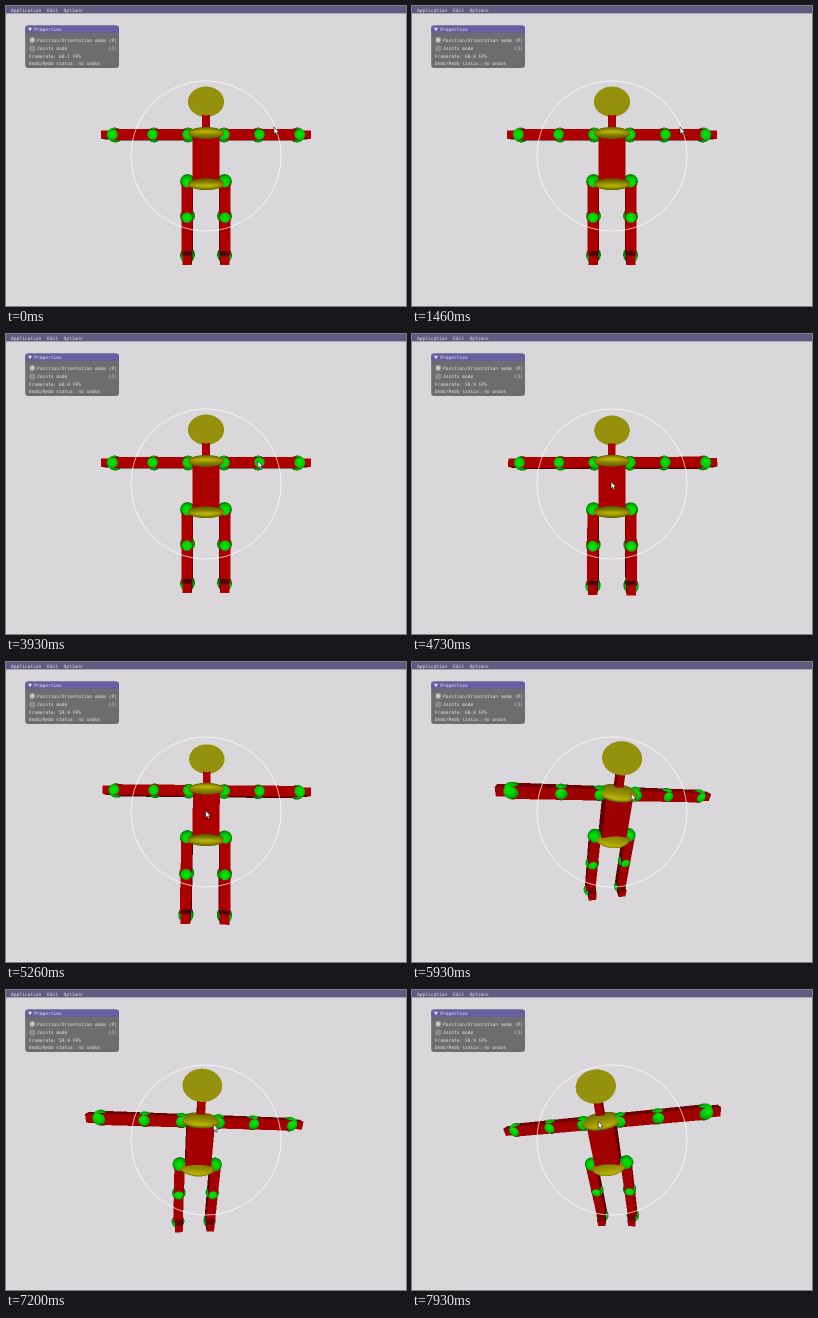
Recreate the animation shown at these times as an HTML page with a canvas. Size 400 px wide and 300 px high, loop 8 s.

```html
<!DOCTYPE html>
<html lang="en">
<head>
<meta charset="utf-8">
<title>Puppet viewer</title>
<style>
  html, body { margin: 0; width: 100%; height: 100%; overflow: hidden; background: #dad7da; }
  canvas, svg { position: absolute; left: 0; top: 0; width: 400px; height: 300px; }
  text { font: 4.58px "DejaVu Sans Mono", monospace; fill: #e4e4e4; white-space: pre; }
</style>
</head>
<body>
<canvas id="stage"></canvas>
<svg viewBox="0 0 400 300">
  <rect width="400" height="7.4" fill="#5f5b80"/>
  <text x="5" y="5.5">Application</text>
  <text x="41" y="5.5">Edit</text>
  <text x="57.5" y="5.5">Options</text>

  <rect x="19.2" y="19.5" width="93.8" height="42.5" rx="3" fill="#6e6c6f"/>
  <path d="M19.2 27V22.5a3 3 0 0 1 3-3h87.8a3 3 0 0 1 3 3V27z" fill="#6660a2"/>
  <path d="M22 21.8h4l-2 3.4z" fill="#e4e4e4"/>
  <text x="28.3" y="25.1">Properties</text>
  <g fill="#8b898c"><circle cx="26.3" cy="34" r="3.3"/><circle cx="26.3" cy="42.6" r="3.3"/></g>
  <circle cx="26.3" cy="34" r="2.2" fill="#c9c8ca"/>
  <text x="31" y="35.7">Position/Orientation mode (P)</text>
  <text x="31" y="44.3">Joints mode</text>
  <text x="102.6" y="44.3">(J)</text>
  <text x="22.7" y="51.7" id="rate"></text>
  <text x="22.7" y="58.7">Undo/Redo status: no undos</text>

  <circle cx="200" cy="150" r="75" fill="none" stroke="#fff" stroke-opacity=".7"/>
  <path id="cursor" d="M-2-4V3L-.4 1.6.8 4.2 2 3.6.9 1.1H3z" fill="#fff" stroke="#111" stroke-width=".6"/>
</svg>
<script>
const LOOP = 8000, CAMERA = 200, SCALE = 2;
const WIDTH = 400 * SCALE, HEIGHT = 300 * SCALE;
const stage = document.getElementById('stage');
stage.width = WIDTH;
stage.height = HEIGHT;
const ctx = stage.getContext('2d');
const image = ctx.createImageData(WIDTH, HEIGHT);
const depth = new Float32Array(WIDTH * HEIGHT);
const rate = document.getElementById('rate');
const cursor = document.getElementById('cursor');

const RED = [172, 0, 0], GREEN = [0, 226, 8], YELLOW = [184, 178, 4], OLIVE = [150, 145, 12];

// Parts lie along the model's own axes: x right, y down, z towards the viewer.
const parts = [];
const box = (mid, size) => parts.push({ mid, size, colour: RED, hit: hitBox, ambient: .4 });
const ellipsoid = (mid, size, colour, ambient = .4) =>
  parts.push({ mid, size, colour, hit: hitEllipsoid, ambient });
const ball = (x, y) => ellipsoid([x, y, 0], [7.3, 7.3, 7.3], GREEN);

for (const side of [-1, 1]) {
  for (const x of [18, 52, 91]) ball(side * x, -21);
  for (const y of [25.5, 60, 99]) ball(side * 18.5, y);
  box([side * 54, -21, 0], [37, 5.3, 5.3]);
  box([side * 97, -21, 0], [6, 4, 4]);
  box([side * 18.5, 61, 0], [5.3, 36, 5.3]);
  box([side * 17.5, 97, 6], [4.2, 4.5, 8]);
}
box([0, 3, 0], [12.9, 21, 9]);
box([0, -34, 0], [3.7, 8, 3.7]);
ellipsoid([0, -22, 0], [19, 6.4, 19], YELLOW);
ellipsoid([0, 27, 0], [19, 6.4, 19], YELLOW);
ellipsoid([0, -54, 0], [18, 14.5, 15], OLIVE, 1);

// Each hit test sets the distance along the ray and how squarely the surface faces the viewer.
const hit = { distance: 0, facing: 0 };

function hitBox(origin, ray, size, view) {
  let near = -Infinity, far = Infinity, axis = 0;
  for (let i = 0; i < 3; i++) {
    const middle = -origin[i] / ray[i], reach = Math.abs(size[i] / ray[i]);
    if (middle - reach > near) { near = middle - reach; axis = i; }
    far = Math.min(far, middle + reach);
  }
  hit.distance = near;
  hit.facing = -Math.sign(ray[axis]) * view[axis];
  return near < far;
}

function hitEllipsoid(origin, ray, size, view) {
  let a = 0, b = 0, c = -1;
  for (let i = 0; i < 3; i++) {
    const o = origin[i] / size[i], r = ray[i] / size[i];
    a += r * r;
    b += o * r;
    c += o * o;
  }
  const root = b * b - a * c;
  if (root < 0) return false;
  hit.distance = (-b - Math.sqrt(root)) / a;
  let along = 0, length = 0;
  for (let i = 0; i < 3; i++) {
    const normal = (origin[i] + ray[i] * hit.distance) / size[i] ** 2;
    along += normal * view[i];
    length += normal * normal;
  }
  hit.facing = along / Math.sqrt(length);
  return true;
}

// Yaw, then pitch, then roll.
function rotate([x, y, z], [yaw, pitch, roll]) {
  const spin = (a, b, degrees) => {
    const angle = degrees * Math.PI / 180, c = Math.cos(angle), s = Math.sin(angle);
    return [a * c - b * s, a * s + b * c];
  };
  [z, x] = spin(z, x, yaw);
  [z, y] = spin(z, y, pitch);
  [x, y] = spin(x, y, roll);
  return [x, y, z];
}

function drawPart({ mid, size, colour, hit: test, ambient }, axes, cx, cy) {
  const place = [0, 1, 2].map(k => axes.reduce((sum, axis, i) => sum + axis[k] * mid[i], 0));
  const zoom = CAMERA / (CAMERA - place[2]);
  const reach = Math.hypot(...size) * zoom * 1.6;
  const x = cx + place[0] * zoom, y = cy + place[1] * zoom;
  const view = axes.map(axis => axis[2]);
  const origin = view.map((v, i) => v * CAMERA - mid[i]);
  const ray = [0, 0, 0];
  const first = v => Math.max(0, Math.floor((v - reach) * SCALE));
  const right = Math.min(WIDTH, (x + reach) * SCALE), bottom = Math.min(HEIGHT, (y + reach) * SCALE);

  for (let py = first(y); py < bottom; py++) {
    for (let px = first(x); px < right; px++) {
      const dx = (px + .5) / SCALE - cx, dy = (py + .5) / SCALE - cy;
      for (let i = 0; i < 3; i++) ray[i] = axes[i][0] * dx + axes[i][1] * dy - axes[i][2] * CAMERA;
      const pixel = py * WIDTH + px;
      if (!test(origin, ray, size, view) || hit.distance >= depth[pixel]) continue;
      depth[pixel] = hit.distance;
      const light = ambient + (1 - ambient) * Math.max(0, hit.facing);
      for (let k = 0; k < 3; k++) image.data[pixel * 4 + k] = colour[k] * light;
      image.data[pixel * 4 + 3] = 255;
    }
  }
}

// time, yaw, pitch, roll (degrees)
const TURNS = [
  [4400, 0, 0, 0],
  [5200, -2, -7, 0],
  [5930, 17.5, 24.5, 7.5],
  [6530, 12.8, 24.5, 6],
  [7200, 6.7, 20, 3.6],
  [7500, 1, 5, -1],
  [7930, -12.5, 24.5, -9.6],
];

const ramp = (time, from, to) => Math.min(1, Math.max(0, (time - from) / (to - from)));

function turnAt(time) {
  const next = Math.max(1, TURNS.findIndex(key => key[0] > time));
  const last = time >= TURNS[TURNS.length - 1][0];
  const b = last ? TURNS[TURNS.length - 1] : TURNS[next], a = last ? b : TURNS[next - 1];
  const mix = last ? 1 : ramp(time, a[0], b[0]);
  return [1, 2, 3].map(i => a[i] + (b[i] - a[i]) * mix);
}

// A quick pan to the lower left that eases back.
function pan(time) {
  const u = Math.max(0, time - 5930) / 270;
  return (u * Math.exp(1 - u)) ** 3;
}

const RATES = ['60.1', '60.0', '59.9', '60.0', '60.0', '59.9', '60.0', '59.9', '59.9'];

function frame(now) {
  const time = now % LOOP;
  const turn = turnAt(time), [yaw, pitch] = turn;
  const drift = ramp(time, 5200, 5930);
  const cx = 200 + 3 * drift - 10 * ramp(time, 6530, 7100) - 65 * pan(time);
  const cy = 150 + 1.5 * drift + 28 * pan(time);
  const axes = [[1, 0, 0], [0, 1, 0], [0, 0, 1]].map(axis => rotate(axis, turn));

  image.data.fill(0);
  depth.fill(Infinity);
  for (const part of parts) drawPart(part, axes, cx, cy);
  ctx.putImageData(image, 0, 0);

  const away = 1 - ramp(time, 3800, 4350);
  const mouseX = 202 + 68 * away + 1.1 * yaw, mouseY = 150 - 25 * away - .6 * pitch;
  cursor.setAttribute('transform', `translate(${mouseX} ${mouseY})`);
  rate.textContent = `Framerate: ${RATES[Math.floor(time / 900)]} FPS`;
  requestAnimationFrame(frame);
}
frame(performance.now());
</script>
</body>
</html>
```
